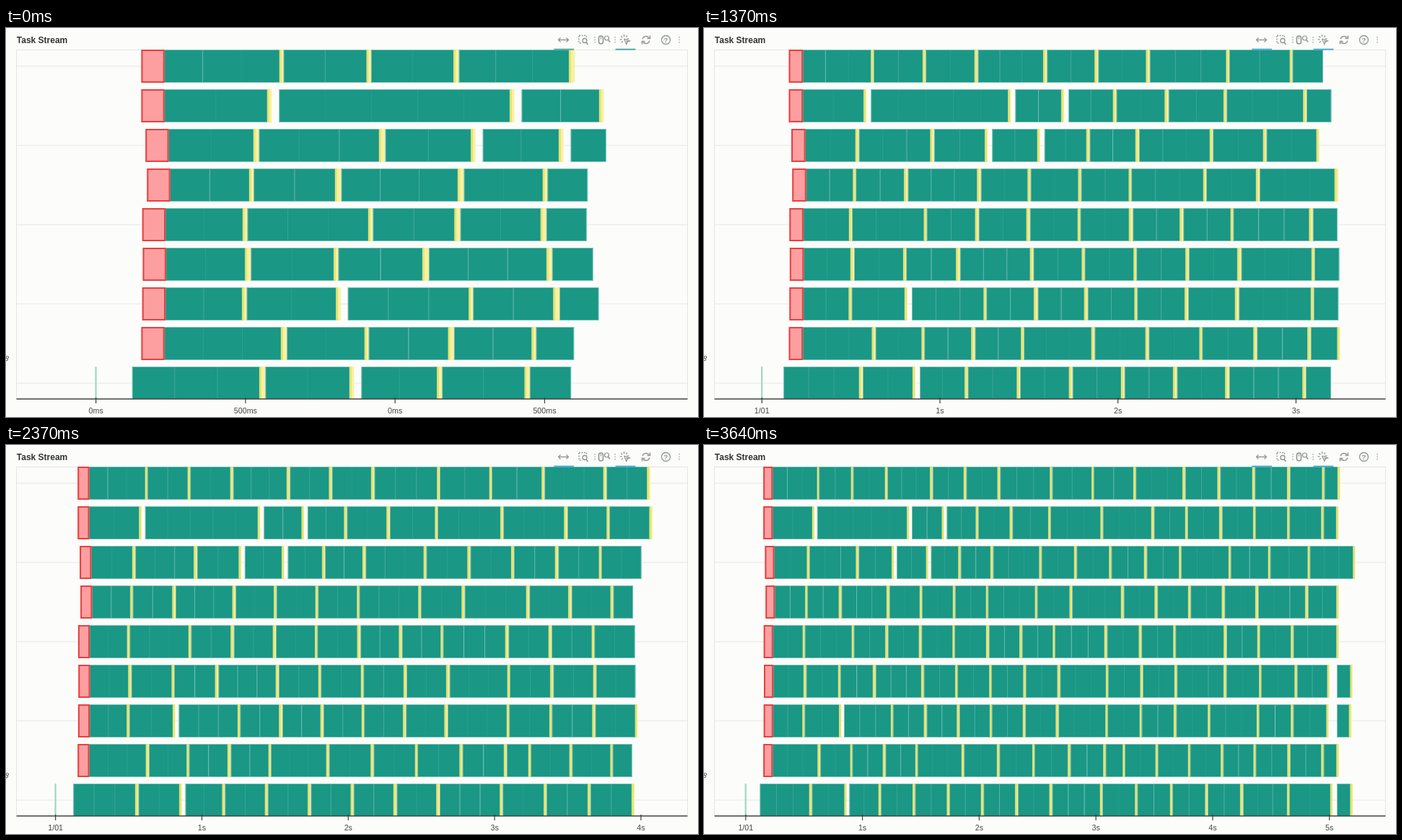
Recreate the animation shown at these times as an HTML page with a canvas. Size 959 by 540 pixels, loop 3.67 s.

```html
<!DOCTYPE html>
<html lang="en">
<head>
<meta charset="utf-8">
<title>Task Stream</title>
<style>
  html, body { margin: 0; width: 100%; height: 100%; overflow: hidden; background: #fcfdfb; }
  canvas { display: block; width: 959px; height: 540px; }
</style>
</head>
<body>
<canvas id="stage" width="959" height="540"></canvas>
<script>
const ctx = document.getElementById('stage').getContext('2d');
const LOOP = 3670;
const LEFT = 15, RIGHT = 945, TOP = 30, BOTTOM = 515;
const PITCH = 55, HEIGHT = 46;
const FONT = '"Liberation Sans", Arial, sans-serif';

// Run times in ms
const PAD = 264.5, LAG = 255;
const BLOCK = 310, TASK = 145, RED = 76;
const PAUSE = 4950, RESUME = 5064;

let seed = 7;
function random() {
  seed = (seed * 16807) % 2147483647;
  return seed / 2147483647;
}

// Blocks spread evenly between key gaps; a wait follows one unbroken block.
function worker(start, red, keys, waits = []) {
  const blocks = [];
  let from = start + red, last = from;
  for (const key of [...keys, ...waits].sort((a, b) => a - b)) {
    const wait = waits.includes(key);
    const count = wait ? 1 : Math.max(1, Math.round((key - last) / BLOCK));
    for (let i = 1; i <= count; i++) {
      const end = last + (key - last) * i / count;
      const width = !wait ? 12 + 8 * random() : key > PAUSE ? RESUME - key : 38;
      const tasks = Math.max(1, Math.round((end - from) / TASK));
      const cuts = Array.from({ length: tasks - 1 }, random);
      blocks.push({ from, end, width, tint: wait ? 14 : width, tasks, cuts });
      from = end + width;
    }
    last = key;
  }
  return { start, red, blocks };
}

const workers = [
  worker(152, RED, [615, 1197, 1583, 2160, 2610, 3325, 3746, 4941, 5074]),
  worker(152, RED, [2265, 2596, 3043, 3478, 4934, 5062], [574, 1385, 1684]),
  worker(166, RED, [528, 948, 2101, 2518, 3716, 4141, 4818, 5206], [1255, 1549]),
  worker(171, RED, [514, 801, 1211, 2063, 2482, 2778, 3219, 4370, 4797, 5064]),
  worker(155, RED, [492, 912, 2064, 2635, 3076, 3667, 4099, 4674, 5064]),
  worker(157, RED, [500, 1093, 1508, 2673, 3090, 3677, 4098, 4706, 5182], [4985]),
  worker(155, RED, [490, 1248, 2660, 3086, 3963, 4382, 4674, 5172], [804, 4978]),
  worker(152, RED, [620, 1458, 1853, 3067, 3234, 4354, 4934, 5064]),
  worker(121, 0, [548, 2605, 3039, 4240, 4642, 5182], [849, 5012])
];

// [time, right end of the axis], advanced in refreshes of about 100 ms
const pace = [[0, 1979], [930, 2946], [1370, 3505], [2100, 4066], [2630, 4703], [3030, 5096], [3640, 5484]];

function axisEnd(t) {
  const i = pace.findIndex(p => p[0] > t);
  if (i < 0) return pace[pace.length - 1][1];
  const [t0, a] = pace[i - 1], [t1, b] = pace[i];
  const n = Math.round((t1 - t0) / 100);
  return a + (b - a) * Math.floor((t - t0) / (t1 - t0) * n) / n;
}

function rect(x, y, w, h, color) {
  ctx.fillStyle = color;
  ctx.fillRect(x, y, w, h);
}

function outline(x, y, w, h, color, width = 1) {
  ctx.strokeStyle = color;
  ctx.lineWidth = width;
  ctx.strokeRect(x, y, w, h);
}

function line(color, width, ...points) {
  ctx.strokeStyle = color;
  ctx.lineWidth = width;
  ctx.beginPath();
  points.forEach(([x, y], i) => i ? ctx.lineTo(x, y) : ctx.moveTo(x, y));
  ctx.stroke();
}

function circle(x, y, r, from = 0, to = Math.PI * 2) {
  ctx.beginPath();
  ctx.arc(x, y, r, from, to);
  ctx.stroke();
}

function text(s, x, y, font, color, align = 'left') {
  ctx.font = font + ' ' + FONT;
  ctx.fillStyle = color;
  ctx.textAlign = align;
  ctx.fillText(s, x, y);
}

function drawBlock(b, done, y, x) {
  const at = i => x(b.from + (b.end - b.from) * i / b.tasks);
  const a = at(0), w = at(done) - a;
  rect(a, y, w, HEIGHT, '#1a9785');
  if (w > 2) outline(a + .5, y + .5, w - 1, HEIGHT - 1, 'rgba(255,255,255,.4)');
  b.cuts.slice(0, done - 1).forEach((c, i) => {
    rect(at(i + 1) - .5, y + 1, 1, HEIGHT - 2, `rgba(255,255,255,${.06 + .4 * c ** 3})`);
  });
}

function drawWorker({ start, red, blocks }, i, now, x) {
  const y = TOP + i * PITCH;
  for (const b of blocks) {
    const share = Math.min(1, (now - b.from) / (b.end - b.from));
    const done = Math.floor(share * b.tasks + 1e-6);
    if (done < 1) break;
    drawBlock(b, done, y, x);
    if (done < b.tasks) break;
    const a = x(b.end) - .3, w = Math.max(2.4, x(b.end + b.tint) - a);
    rect(a, y, w, HEIGHT, '#f8f1a2');
    rect(a, y, Math.min(w, 2.4), HEIGHT, '#e8e266');
  }
  if (red) {
    const a = x(start), w = x(start + red) - a;
    rect(a, y, w, HEIGHT, '#fd9fa1');
    outline(a + .8, y + 1, w - 1.2, HEIGHT - 2, '#e8403f', 2);
  } else {
    rect(x(0) - 1.2, y, 2.2, HEIGHT, '#a3d5c2');
  }
}

function magnifier(x, y) {
  circle(x, y, 3);
  line('#8f9494', 1.6, [x + 2, y + 2.4], [x + 4.6, y + 5.6]);
}

function toolbar(t) {
  const gray = '#8f9494';
  line(gray, 1.4, [766, 16.5], [779, 16.5]);
  line(gray, 1.3, [768.5, 13.5], [765.5, 16.5], [768.5, 19.5]);
  line(gray, 1.3, [776.5, 13.5], [779.5, 16.5], [776.5, 19.5]);

  ctx.setLineDash([2, 1.6]);
  ctx.strokeRect(794, 10.5, 10.5, 10.5);
  ctx.setLineDash([]);
  rect(798.5, 14.5, 8, 8, '#fcfdfb');
  magnifier(802, 17.5);

  for (const x of [816, 844, 933])
    for (const y of [12, 15.5, 19]) rect(x - .6, y, 1.3, 1.8, '#a5aaaa');

  ctx.beginPath();
  ctx.roundRect(821.5, 11, 6, 11, 3);
  ctx.stroke();
  line(gray, 1.2, [824.5, 12.5], [824.5, 15.5]);
  magnifier(832.5, 14);

  for (let k = 0; k < 7; k++) {
    const a = Math.PI * (.72 + k * .25), c = Math.cos(a), s = Math.sin(a);
    line(gray, 1.2, [857 + c * 3.4, 15.5 + s * 3.4], [857 + c * 6.4, 15.5 + s * 6.4]);
  }
  line(gray, 1.2, [856.5, 15], [864.5, 18], [861, 19.2], [859.8, 22.6], [856.5, 15]);

  ctx.lineWidth = 1.5;
  circle(887, 16.5, 5, Math.PI * 1.08, Math.PI * 1.8);
  circle(887, 16.5, 5, Math.PI * .08, Math.PI * .8);
  line(gray, 1.5, [892.5, 10.5], [892.5, 14.5], [888.5, 14.5]);
  line(gray, 1.5, [881.5, 22.5], [881.5, 18.5], [885.5, 18.5]);

  ctx.lineWidth = 1.3;
  circle(914.5, 16.5, 6);
  text('?', 914.5, 20, 'bold 9.5px', gray, 'center');

  const active = t < 500 ? '#48a99e' : '#3fa6d6';
  for (const x of [759.3, 844.6]) rect(x, 28.7, 27.8, 1.9, active);
}

function axis(x, end) {
  rect(LEFT - .5, 514.3, RIGHT - LEFT, 1.4, '#3a3d3c');
  const fine = end + PAD < 3000, gap = fine ? 500 : 1000;
  for (let k = 0; k * gap <= end; k++) {
    const px = x(k * gap);
    rect(px - .6, 513, 1.2, 8, '#3a3d3c');
    const label = fine ? (k % 2 ? '500ms' : '0ms') : (k ? k + 's' : '1/01');
    text(label, px, 534.8, '10.7px', '#444', 'center');
  }
}

function draw(t) {
  const end = axisEnd(t);
  const x = ms => LEFT + (RIGHT - LEFT) * (ms + PAD) / (end + PAD);

  rect(0, 0, 959, 540, '#fcfdfb');
  for (let i = 0; i < 5; i++) rect(LEFT, 52.5 + i * 110, RIGHT - LEFT, 1, '#e5e7e5');
  outline(14.5, 30.5, 930, 484, '#e3e5e3');

  ctx.save();
  ctx.beginPath();
  ctx.rect(LEFT, TOP, RIGHT - LEFT, BOTTOM - TOP);
  ctx.clip();
  workers.forEach((w, i) => drawWorker(w, i, end - LAG, x));
  ctx.restore();

  axis(x, end);
  text('Task Stream', 14.8, 20.6, 'bold 12px', '#303331');
  ctx.save();
  ctx.translate(-2.5, 461.5);
  ctx.rotate(.2);
  text('8', 0, 0, 'italic 10px', '#444');
  ctx.restore();
  toolbar(t);
}

const begin = performance.now();
function frame() {
  draw((performance.now() - begin) % LOOP);
  requestAnimationFrame(frame);
}
draw(0);
requestAnimationFrame(frame);
</script>
</body>
</html>
```
